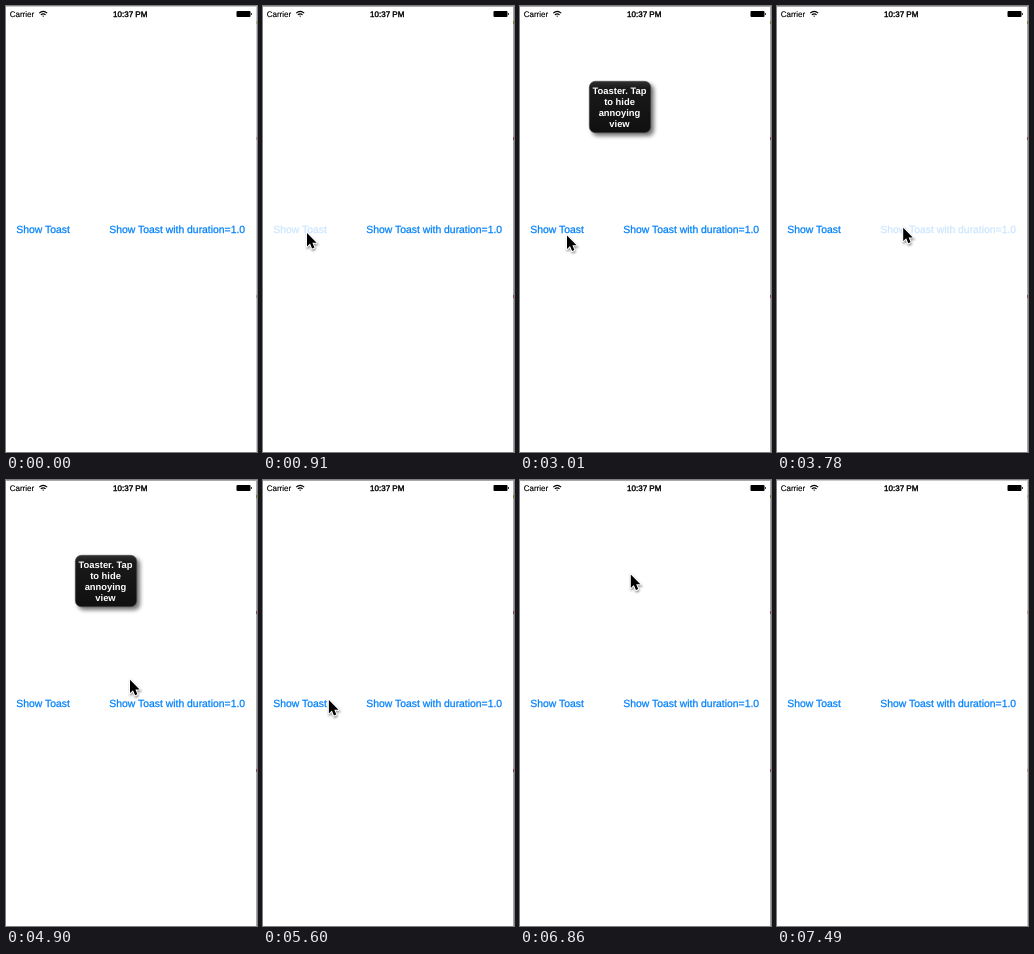
An HTML page that plays this animation: 251x446 px, repeating every 7630 ms.

```html
<!DOCTYPE html>
<html lang="en">
<head>
<meta charset="utf-8">
<title>Toast demo</title>
<style>
  html, body { margin: 0; width: 100%; height: 100%; overflow: hidden; background: #fff; }
  svg { display: block; width: 251px; height: 446px; }
  text { font-family: "Liberation Sans", Arial, sans-serif; text-rendering: geometricPrecision; }
  .status { font-size: 8px; fill: #000; stroke: #000; stroke-width: .15px; }
  .clock { stroke-width: .4px; text-anchor: middle; }
  .button { font-size: 10.4px; fill: #0080fa; stroke: #0080fa; stroke-width: .25px; }
  .message { font-size: 9.4px; font-weight: bold; fill: #fff; text-anchor: middle; }
</style>
</head>
<body>
<svg viewBox="0 0 251 446">
  <defs>
    <linearGradient id="gloss" x1="0" y1="0" x2="0" y2="1">
      <stop offset="0" stop-color="#303030"/>
      <stop offset=".14" stop-color="#191919"/>
      <stop offset="1" stop-color="#101010"/>
    </linearGradient>
    <filter id="soft" x="-30%" y="-30%" width="160%" height="160%">
      <feGaussianBlur stdDeviation="2.2"/>
    </filter>
    <filter id="faint" x="-50%" y="-50%" width="200%" height="200%">
      <feGaussianBlur stdDeviation=".9"/>
    </filter>
    <path id="arrow" d="M0 0V13.4L3 10.6 5.1 15.6 7.4 14.6 5.4 9.8H9.6Z"/>
  </defs>

  <rect width="251" height="446" fill="#fff"/>
  <g id="edge">
    <path d="M0 .5H251M250.5 0V446" fill="none" stroke="#a8a8a8"/>
    <path d="M250.5 15v3" stroke="#7d7a30"/>
    <path d="M250.5 131v3M250.5 289v3" stroke="#8d4450"/>
  </g>

  <text class="status" x="3.7" y="11">Carrier</text>
  <g fill="none" stroke="#000" stroke-width="1.1">
    <path d="M33.2 7.2Q37.2 3.6 41.2 7.2M34.8 8.9Q37.2 6.7 39.6 8.9"/>
    <path d="M36.2 9.8H38.2L37.2 11Z" fill="#000" stroke="none"/>
  </g>
  <text class="status clock" x="124.2" y="11">10:37 PM</text>
  <rect x="230.5" y="5" width="14" height="6" rx="1"/>
  <path d="M245 7V9Q246 8.8 246 8T245 7Z"/>

  <text class="button" id="first" x="10.3" y="227.4">Show Toast</text>
  <text class="button" id="second" x="103.3" y="227.4">Show Toast with duration=1.0</text>

  <g id="toast">
    <rect x="72" y="78" width="62" height="52" rx="6" fill="#000" opacity=".55" filter="url(#soft)"/>
    <rect x="69.3" y="75.3" width="61.4" height="51.4" rx="6" fill="url(#gloss)" stroke="#4a4a4a" stroke-width=".6"/>
    <text class="message" x="99.5" y="88">Toaster. Tap</text>
    <text class="message" x="99.5" y="99.2">to hide</text>
    <text class="message" x="99.5" y="110.3">annoying</text>
    <text class="message" x="99.5" y="121.4">view</text>
  </g>

  <g id="cursor">
    <use href="#arrow" x=".6" y="1.6" opacity=".45" stroke="#000" stroke-width="1.6" filter="url(#faint)"/>
    <use href="#arrow" fill="#000" stroke="#fff" stroke-width="2" stroke-linejoin="round" paint-order="stroke"/>
  </g>
</svg>
<script>
const LOOP = 7630, STEP = 70, FADE = 280;
const $ = id => document.getElementById(id);

const linear = k => k;
const easeIn = k => k * k;
const easeOut = k => 1 - (1 - k) ** 2;
const smooth = k => k * k * (3 - 2 * k);

// time, x, y, easing used to arrive there
const path = [
  [210, 130, 15], [770, 44, 227, easeOut],
  [2940, 44, 227], [3010, 47, 229.5],
  [3710, 126.2, 221.7, smooth], [3920, 126.2, 221.7],
  [4550, 123.4, 200.5, smooth], [4830, 123.4, 200.5],
  [4900, 124, 199.7], [5250, 124, 199.7],
  [5740, 51.5, 225, smooth], [5950, 51.5, 225],
  [6230, 83.4, 205, easeIn], [6440, 108, 108, easeOut],
  [6720, 108, 108], [7420, 135, -22, smooth]
];
// press and release times
const presses = {
  first: [[910, 1050], [5880, 5950]],
  second: [[3780, 3920]]
};
const toasts = [[1050, 3080], [3990, 5040], [5950, 6650]];
const focus = [[910, 7420]];

const within = (t, spans) => spans.some(([a, b]) => t >= a && t < b);

function cursorAt(t) {
  const i = path.findIndex(p => p[0] > t);
  if (i < 1) return null;
  const [t0, x0, y0] = path[i - 1];
  const [t1, x1, y1, ease = linear] = path[i];
  const k = ease((t - t0) / (t1 - t0));
  return [x0 + (x1 - x0) * k, y0 + (y1 - y0) * k];
}

function buttonAlpha(t, spans) {
  const last = spans.filter(s => s[0] <= t).pop();
  if (!last) return 1;
  if (t < last[1]) return 0.2;
  return 0.2 + 0.8 * smooth(Math.min(1, (t - last[1]) / FADE));
}

const show = (id, on) => $(id).setAttribute("visibility", on ? "visible" : "hidden");

function draw(t) {
  for (const id in presses) $(id).setAttribute("opacity", buttonAlpha(t, presses[id]));
  show("toast", within(t, toasts));
  $("edge").setAttribute("opacity", within(t, focus) ? 1 : 0.6);
  const pos = cursorAt(t);
  show("cursor", pos);
  if (pos) $("cursor").setAttribute("transform", `translate(${pos})`);
}

const start = performance.now();
function tick() {
  const t = (performance.now() - start) % LOOP;
  draw(Math.floor(t / STEP) * STEP);
  requestAnimationFrame(tick);
}
tick();
</script>
</body>
</html>
```
